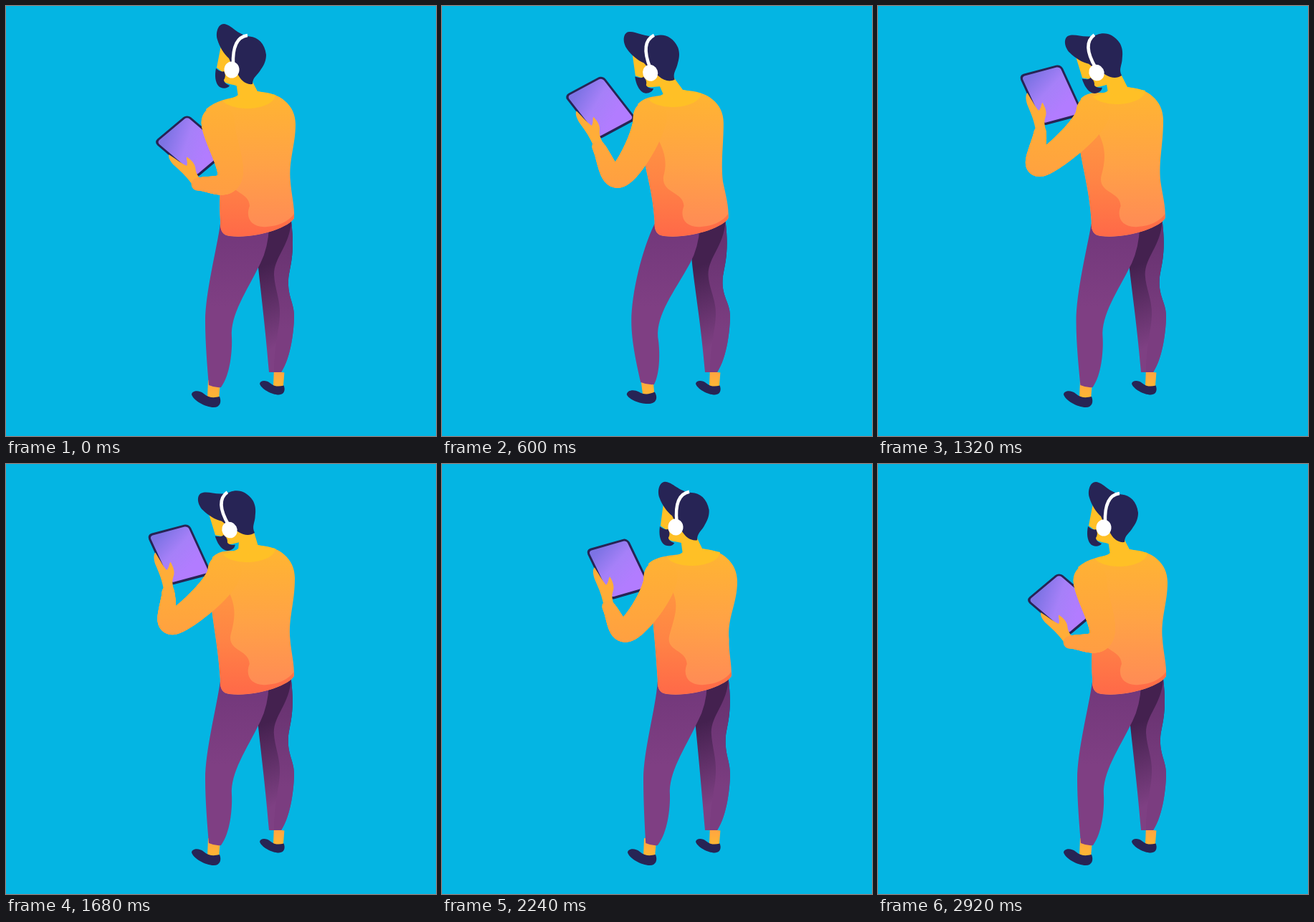
Recreate the animation shown at these times as an HTML page with a canvas. Size 600x600 px, loop 2.96 s.

```html
<!DOCTYPE html>
<html lang="en">
<head>
<meta charset="utf-8">
<title>Man with tablet</title>
<style>
html, body { margin: 0; width: 100%; height: 100%; overflow: hidden; background: #04b5e3; }
canvas { display: block; }
</style>
</head>
<body>
<canvas id="stage" width="600" height="600"></canvas>
<script>
const ctx = document.getElementById('stage').getContext('2d');
const LOOP = 2960;
const NAVY = '#272455', SKIN = '#ffc026';

// head x, y, angle | neck x | shoulder x, y | knee x | tablet x, y, angle | arm root x, y | elbow x, y
const rest = [315, 89, 0, 0, 0, 0, 0, 209, 190, -40, 296, 162, 312, 240];
const keys = [
  [0, rest],
  [320, [302, 90, -3.5, -7, -8, 0, -4, 184, 167, -39, 287, 160, 284, 243]],
  [580, [291, 93, -18, -14, -11, -2, -13, 173, 128, -29, 290, 155, 250, 237]],
  [920, [288, 99, -30, -20, -13, -3, -24, 196, 102, -17, 292, 150, 217, 221]],
  [1320, [305, 93, -28, -3, -6, -6, -1.5, 199, 98, -15, 300, 147, 227, 221]],
  [1680, [312, 92, -28, 0, -1, -6, 0, 199, 100, -15, 305, 148, 234, 221]],
  [2240, [326, 88, -3.5, 12, 8, -1, 3, 203, 121, -16, 305, 157, 259, 231]],
  [2900, rest],
  [LOOP, rest]
];

// Monotone cubic interpolation between the key poses
function slope(j, c) {
  if (j === 0 || j === keys.length - 1) return 0;
  const [[ta, a], [tb, b], [td, d]] = [keys[j - 1], keys[j], keys[j + 1]];
  const left = (b[c] - a[c]) / (tb - ta), right = (d[c] - b[c]) / (td - tb);
  return left * right <= 0 ? 0 : 2 * left * right / (left + right);
}

// Cubic from a to b with end tangents ma and mb
function hermite(a, b, ma, mb, u) {
  const v = 1 - u;
  return a * (1 + 2 * u) * v * v + b * u * u * (3 - 2 * u) + u * v * (ma * v - mb * u);
}

function poseAt(time) {
  let i = 0;
  while (i < keys.length - 2 && keys[i + 1][0] <= time) i++;
  const [t0, a] = keys[i], [t1, b] = keys[i + 1], span = t1 - t0;
  return a.map((p, c) =>
    hermite(p, b[c], span * slope(i, c), span * slope(i + 1, c), (time - t0) / span));
}

const rad = deg => deg * Math.PI / 180;
const mix = (a, b, u) => a + (b - a) * u;

function gradient(x0, y0, x1, y1, ...colors) {
  const g = ctx.createLinearGradient(x0, y0, x1, y1);
  colors.forEach((c, i) => g.addColorStop(i / (colors.length - 1), c));
  return g;
}

const cloth = gradient(0, 120, 0, 320, '#ffb531', '#ffa246', '#ff8857');
const sleeve = gradient(0, 125, 0, 265, '#ffb333', '#ff9d43');
const shadow = gradient(0, 175, 0, 318, '#ff9640', '#ff8345', '#ff6a48');
const pants = gradient(0, 315, 0, 420, '#73387b', '#7f3f83');
const farPants = gradient(352, 365, 392, 470, '#44214f', '#7e4083');
const farStrip = gradient(0, 320, 0, 450, '#673270', '#7b3d80');
const screen = gradient(6, 8, 34, 58, '#7d73e4', '#a680f8', '#b27cff');
const ankle = gradient(0, 525, 0, 546, '#ffa640', '#ffb634');

function fill(path, color) {
  ctx.fillStyle = color;
  ctx.fill(new Path2D(path));
}

function disc(x, y, rx, ry = rx) {
  ctx.beginPath();
  ctx.ellipse(x, y, rx, ry, 0, 0, 7);
  ctx.fill();
}

function box(x, y, w, h, r, color) {
  ctx.fillStyle = color;
  ctx.beginPath();
  ctx.roundRect(x, y, w, h, r);
  ctx.fill();
}

function placed(draw, x, y, angle = 0, scale = 1, px = 0, py = 0) {
  ctx.save();
  ctx.translate(x, y);
  ctx.rotate(rad(angle));
  ctx.scale(scale, scale);
  ctx.translate(-px, -py);
  draw();
  ctx.restore();
}

// A point given relative to an origin, turned by an angle
function turned(x, y, angle, ox, oy) {
  const c = Math.cos(rad(angle)), s = Math.sin(rad(angle));
  return [ox + x * c - y * s, oy + x * s + y * c];
}

function foot() {
  fill('M282 522L299 524L297 549L281 547Z', ankle);
  fill('M259 542C260 536 270 536 276 541C283 547 290 547 298 545C301 552 299 560 290 560C278 560 261 550 259 542Z', NAVY);
}

function farLeg(h) {
  placed(foot, 354, 527, 0, 0.86, 259, 542);
  const right = `C398 490 402 450 402 432C402 415 ${393 + h} 405 ${394 + h} 383C${395 + h} 365 ${404 + h} 350 ${398 + h} 300`;
  fill(`M${350 + h} 305L${351 + h} 355C${355 + h} 395 361 440 367 511L384 511${right}Z`, farPants);
  fill(`M374 511L384 511${right}C${396 + h} 335 ${374 + h} 350 ${374 + h} 375C${375 + h} 395 383 410 382 432C381 455 373 480 374 511Z`, farStrip);
}

function nearLeg(h, k) {
  const lift = Math.max(0, (-k - 4) / 20);
  placed(foot, 280 - lift, 548 - 7 * lift, -20 * lift, 1, 280, 548);
  fill(`M${299 + h} 304C${294 + h + 0.9 * k} 340 ${278 + k} 400 ${278 + k} 440
    C${278 + k} 470 ${281 + 0.6 * k} 505 ${283 + 0.42 * k} ${529 - 8 * lift}
    Q${292 + 0.36 * k} ${533 - 8 * lift} ${300 + 0.3 * k} ${532 - 8 * lift}
    C${313 + 0.6 * k} ${515 - 6 * lift} ${316 + 0.85 * k} 480 ${315 + k} 462
    C${313 + k} 430 ${335 + 0.85 * k} 400 ${355 + 0.65 * k} 359
    Q${366 + h + 0.4 * k} 337 ${367 + h + 0.35 * k} 308Z`, pants);
}

function tablet() {
  ctx.save();
  ctx.transform(1, 0, 0.17, 1, 0, 0);
  box(-2, -2, 61, 77, 7, NAVY);
  box(1, 1, 55, 70.5, 4.5, screen);
  ctx.restore();
  fill('M3 25C-1 27 -2 36 -1 43C0 52 2 60 1 76L15 84C14 76 15 70 18 65C23 59 22 51 20 43.5C17 45 17 50 12 53C9 48 7 38 3 25Z', '#ffad38');
}

// Sleeve from shoulder over elbow to wrist, bowed outwards at the bend
function arm(sx, sy, ex, ey, wx, wy) {
  const bx = 0.6 * (wx - sx), by = 0.6 * (wy - sy);
  ctx.fillStyle = sleeve;
  for (let u = 0; u <= 1; u += 0.02) {
    disc(hermite(sx, ex, 0, bx, u), hermite(sy, ey, 60, by, u), mix(23.5, 17, u));
    disc(hermite(ex, wx, bx, wx - ex, u), hermite(ey, wy, by, wy - ey, u), mix(17, 8.5, u));
  }
}

function head() {
  fill('M300 55L294 86L303 93L303 105C310 110 317 109 323 112L342 108L335 60Z', SKIN);
  fill('M293 87C291 97 292 106 296 111C300 116 309 116 312 111C307 109 304 106 304 103C307 99 306 94 304 91C300 93 296 89 293 87Z', NAVY);
  fill(`M304 25C296 25 292 37 295 47C298 57 304 67 311 73L314 80L325 98
    C329 105 336 110 344 109C344 99 351 97 356 88C361 81 363 75 363 68C361 52 352 44 340 42.5C322 40 315 26 304 25Z`, NAVY);
  ctx.strokeStyle = ctx.fillStyle = '#fff';
  ctx.lineWidth = 4.5;
  ctx.stroke(new Path2D('M337 41C322 43 316 58 317 82'));
  disc(315, 89, 10.5, 11.5);
}

function draw(time) {
  const [hx, hy, ha, n, s, ny, k, tx, ty, ta, sx, sy, ex, ey] = poseAt(time);
  const h = s * 0.22, w = s * 0.45;

  ctx.fillStyle = '#04b5e3';
  ctx.fillRect(0, 0, 600, 600);
  farLeg(h);
  nearLeg(h, k);
  placed(tablet, tx, ty, ta);

  const px = mix(sx, ex, 0.3), py = mix(sy, ey, 0.3);
  const hem = `C${395 + h} 309 ${350 + h} 325 ${312 + h} 321C${302 + h} 320 ${299 + h} 313 ${299 + h} 304`;
  const side = `${299 + h} 300C${296 + h} 250 ${px + 3} ${py + 45} ${px} ${py}`;
  const torso = `M${324 + n} ${126 + ny}L${352 + n} ${120 + ny}
    C${382 + s} ${120 + ny} ${404 + s} ${138 + ny} ${404 + s} ${165 + ny}
    C${404 + s} 195 ${394 + w} 215 ${397 + w} 245C${398 + h} 262 ${403 + h} 280 ${402 + h} 296${hem}
    L${side}L${sx - 17} ${sy - 18}C${sx - 4} ${sy - 30} ${312 + n} ${129 + ny} ${324 + n} ${126 + ny}Z`;
  fill(torso, cloth);
  ctx.save();
  ctx.clip(new Path2D(torso));
  fill(`M${308 + 0.9 * n} 172C${320 + n} 195 ${322 + w} 210 ${314 + w} 238
    C${309 + h} 262 ${339 + h} 258 ${340 + h} 279C${333 + h} 297 ${344 + h} 310 ${364 + h} 308
    Q${390 + h} 306 ${402 + h} 290L${402 + h} 296${hem}L${side}Z`, shadow);
  ctx.restore();

  arm(sx, sy, ex, ey, ...turned(6, 82, ta, tx, ty));

  fill(`M${303 + n} ${132 + ny}Q${320 + n} ${128 + ny} ${324 + n} ${124 + ny}L${352 + n} ${119 + ny}
    L${376 + n} ${124 + ny}C${375 + n} ${138 + ny} ${350 + n} ${143 + ny} ${338 + n} ${143 + ny}
    C${320 + n} ${143 + ny} ${306 + n} ${138 + ny} ${303 + n} ${132 + ny}Z`, SKIN);
  const jaw = turned(6, 17, ha, hx, hy), nape = turned(29, 17, ha, hx, hy);
  fill(`M${jaw}L${nape}L${352 + n} ${121 + ny}L${340 + n} ${133 + ny}L${324 + n} ${127 + ny}Z`, SKIN);
  placed(head, hx, hy, ha, 1, 315, 89);
}

function frame(now) {
  draw(now % LOOP);
  requestAnimationFrame(frame);
}
requestAnimationFrame(frame);
</script>
</body>
</html>
```
